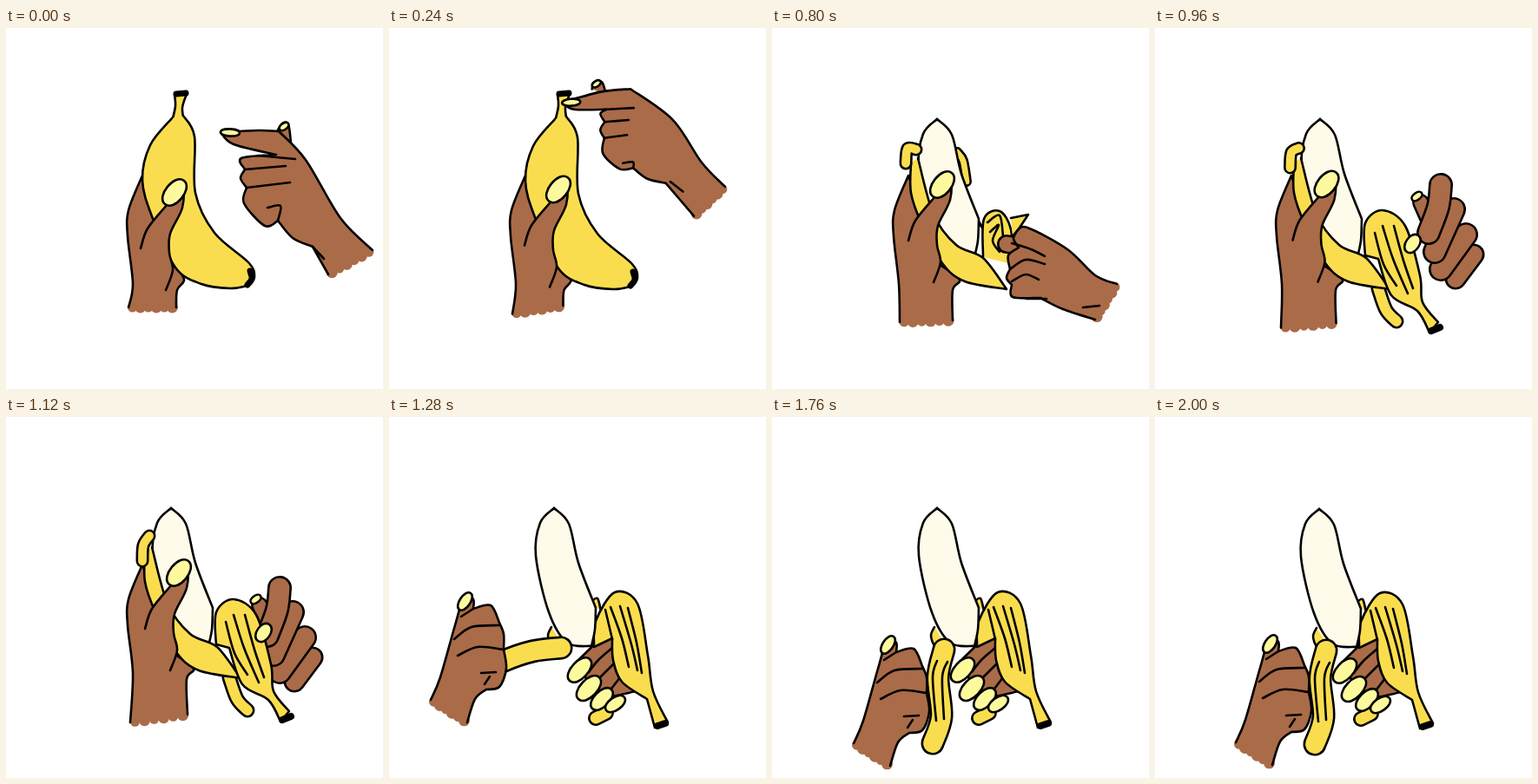
An HTML page with a canvas for the animation above (2.08 s loop, 434x416 px).

```html
<!DOCTYPE html>
<html lang="en">
<head>
<meta charset="utf-8">
<title>Peeling a banana</title>
<style>
html, body { margin: 0; width: 100%; height: 100%; overflow: hidden; background: #fff; }
canvas { display: block; }
</style>
</head>
<body>
<canvas id="c" width="434" height="416"></canvas>
<script>
const ctx = document.getElementById('c').getContext('2d');
const LOOP = 2080, STEP = 80, LINE = 2.6;
const INK = '#000', SKIN = '#aa6b48', PEEL = '#fadd4f', NAIL = '#fdfa9e', FLESH = '#fefbea';

const nums = s => (s.match(/-?[\d.]+/g) || []).map(Number);

// Blend two strings that hold the same count of numbers.
function mix(a, b, k) {
  const to = nums(b);
  let i = 0;
  return a.replace(/-?[\d.]+/g, n => (+n + (to[i++] - n) * k).toFixed(1));
}

// Keys alternate time and value; the value is eased between them.
function at(t, ...keys) {
  if (t <= keys[0]) return keys[1];
  for (let i = 2; i < keys.length; i += 2) {
    if (t <= keys[i]) {
      const k = (t - keys[i - 2]) / (keys[i] - keys[i - 2]);
      return mix(keys[i - 1], keys[i + 1], k * k * (3 - 2 * k));
    }
  }
  return keys[keys.length - 1];
}

// Smooth curve through points; "|" makes a corner, ";" starts a new line.
function trace(s) {
  ctx.beginPath();
  for (const sub of s.split(';')) {
    let last;
    for (const seg of sub.split('|')) {
      const n = nums(seg), p = last ? [last] : [];
      for (let i = 0; i < n.length; i += 2) p.push([n[i], n[i + 1]]);
      if (!last) ctx.moveTo(...p[0]);
      const end = p.length - 1, get = i => p[Math.max(0, Math.min(end, i))];
      for (let i = 0; i < end; i++) {
        const [a, b, c, d] = [get(i - 1), get(i), get(i + 1), get(i + 2)];
        ctx.bezierCurveTo(b[0] + (c[0] - a[0]) / 6, b[1] + (c[1] - a[1]) / 6,
          c[0] - (d[0] - b[0]) / 6, c[1] - (d[1] - b[1]) / 6, c[0], c[1]);
      }
      last = p[end];
    }
  }
}

function shape(s, fill) {
  trace(s);
  if (fill) { ctx.fillStyle = fill; ctx.fill(); }
  ctx.stroke();
}

// Outlined band with round ends along a curve.
function band(s, width, color) {
  trace(s);
  ctx.lineWidth = width;
  ctx.stroke();
  ctx.strokeStyle = color;
  ctx.lineWidth = width - 2 * LINE;
  ctx.stroke();
  ctx.strokeStyle = INK;
  ctx.lineWidth = LINE;
}

// Pointed oval from root to tip.
function nail(s, width) {
  const [x, y, u, v] = nums(s);
  const dx = (v - y) * width / 2, dy = (x - u) * width / 2;
  ctx.beginPath();
  ctx.moveTo(x, y);
  ctx.bezierCurveTo(x + dx, y + dy, u + dx, v + dy, u, v);
  ctx.bezierCurveTo(u - dx, v - dy, x - dx, y - dy, x, y);
  ctx.fillStyle = NAIL;
  ctx.fill();
  ctx.stroke();
}

function shifted(offset, draw) {
  ctx.save();
  ctx.translate(...nums(offset));
  draw();
  ctx.restore();
}

// Skin outline whose open ends form a ragged wrist.
function arm(s) {
  const n = nums(s), [u, v] = n.slice(-2);
  ctx.fillStyle = SKIN;
  for (let i = 0; i < 6; i++) {
    const k = (i + .5) / 6;
    ctx.beginPath();
    ctx.arc(n[0] + (u - n[0]) * k, n[1] + (v - n[1]) * k, 5.5 + i % 2, 0, 7);
    ctx.fill();
  }
  shape(s, SKIN);
}

function holdBack(t) {
  const [x, y, u, v, heel] = nums(at(t, 0, '141 322 196 322 205', 480, '143 337 205 318 214',
    800, '147 339 208 337 216', 1120, '143 352 209 343 216'));
  arm(`${x} ${y} 146 295 140 240 141 210 157 170|195 274|${heel} 290 ${heel - 8} 302 ${u} ${v}`);
}

function holdThumb(t) {
  shifted(at(t, 0, '-2 9', 480, '0 2', 800, '0 0', 1120, '3 -1'), () => {
    shape('157 245 165 222 187 195|199 169 206 170 205 198 191 228 190 250 194 270 186 293', SKIN);
    nail('185 194 207 167', .8);
  });
}

function whole(t) {
  const stem = at(t, 240, '194 77 195 90 191 108|205 108|203 92 208 76', 480, '223 81 216 92 205 108|219 108|227 94 235 83');
  const n = nums(stem);
  shape(stem, PEEL);
  band([n[0] + 2, n[1] - 1, ...n.slice(-2).map(v => v - 1)].join(' '), 7, INK);
  shifted(at(t, 0, '0 0', 480, '0 2'), () => {
    shape('191 104 166 135 157 175 168 217 195 276 225 295 258 300 278 297|286 287 279 270 240 236 218 190 217 125 204 101', PEEL);
    band('281 280 283 289 278 296', 7, INK);
  });
  if (t >= 400) {
    nail('174 124 187 122', .5);
    shape('179 119 169 133 170 148');
  }
}

const reachPose = (t, a, b) => at(t, 0, a, 320, b);

function reachThumb(t) {
  shape(reachPose(t, '311 121 318 110 325 111 328 132', '198 92 199 85 209 84 214 97'), SKIN);
  nail(reachPose(t, '315 117 325 110', '198 89 207 83'), .8);
}

function reachHand(t) {
  arm(reachPose(t,
    '422 256 385 219 345 152 314 119|290 118 247 120|262 134 311 146|271 150 275 163|270 173 277 184|274 202 298 228 313 222|330 242 353 252|371 284',
    '359 200 334 174 302 128 250 92|215 96 170 110|182 117 218 115|217 120 222 129|217 138 221 147|220 165 238 181 254 181|270 192 291 196|326 235'));
  shape(reachPose(t,
    '290 147 333 151;275 163 322 159;277 184 327 178;313 222 316 205 301 207;353 252 366 266',
    '218 115 251 112;222 129 246 127;221 147 243 144;254 181 253 176 242 177;297 194 312 205'));
  nail(reachPose(t, '247 120 269 121', '169 111 190 109'), .5);
}

const flesh = () =>
  shape('190 105 207 123 218 168 238 220|237 245 233 264|205 260 184 225 169 160 174 122 190 105', FLESH);

function halfPeeled(t) {
  if (t > 900) band('257 300 266 325 278 338', 17, PEEL);
  if (t < 900) {
    band('213 143 220 153 224 177', 12, PEEL);
    shape('216 170 225 200 245 234|228 210 216 175', PEEL);
  }
  flesh();
  shape('160 155 160 190 172 225 196 271 222 292 270 301|243 265 212 250 186 215 168 150', PEEL);
  band(at(t, 640, '170 123 159 132 157 148', 800, '166 140 156 139 154 156', 1120, '165 137 158 148 157 166'), 15, PEEL);
}

function pull(t) {
  shape(at(t, 640, '205 250 190 180 205 140 228 165 270 270',
    800, '243 264 244 220 262 211 275 232 276 272'), PEEL);
  shifted(at(t, 640, '-50 -90', 800, '0 0', 880, '6 6'), () => {
    if (t >= 720) shape('248 224 262 216 266 240;251 235 261 227 254 245 262 258');
    shape('275 219 295 215|285 230 277 240', PEEL);
    band('282 251 270 249', 22, SKIN);
    arm('397 295 372 285 340 255 294 230 282 234|278 243 284 253|272 262 274 278|270 288 276 296|277 310 309 311|335 324 372 336');
    shape('276 248 298 255 314 263;274 278 292 267 314 272;276 292 292 284 307 290;293 312 316 312;358 322 377 320');
  });
}

function fold(t) {
  shifted(at(t, 960, '14 -16', 1120, '0 0'), () => {
    band('292 217 300 235', 20, SKIN);
    nail('282 214 293 206', .8);
    band('353 277 332 305', 25, SKIN);
    band('344 254 315 294', 28, SKIN);
    band('330 225 308 274', 28, SKIN);
    band('315 197 312 222 301 252', 28, SKIN);
  });
  shape('242 264 242 225 262 210 288 228 305 285 308 316 326 339|316 351|302 326 272 308 257 266|242 262', PEEL);
  band('318 349 328 345', 8, INK);
  shape('253 236 263 272 278 297;262 228 274 266 291 306;275 228 286 268 297 300');
  nail('290 258 303 239', .9);
}

function opened(t) {
  shape('187 242 183 252 188 264 200 262', PEEL);
  shape('233 213 240 209 244 224', PEEL);
  band('238 347 250 341', 18, PEEL);
  shape('253 246 218 280|240 320 285 316|253 246', SKIN);
  shape('257 266 241 280 230 294;260 283 240 303;266 300 253 317');
  for (const tip of ['208 304 231 279', '218 325 242 300', '234 336 256 314', '250 338 271 323']) nail(tip, .75);
  shape('236 262 238 235 260 202 286 215 298 275 304 316 321 352|306 358|297 325|268 305 258 280 257 255|236 265', PEEL);
  shape('249 222 257 256;255 219 268 255 276 288;266 218 279 262 286 292;275 220 285 260 291 295');
  band('309 356 318 353', 8, INK);
  flesh();
  band(at(t,
    1200, '194 250 172 222 155 190 149 159',
    1280, '198 266 165 270 130 282 107 295',
    1360, '198 268 180 295 162 325 149 351',
    1440, '198 268 191 300 195 345 185 376'), 27, PEEL);
  if (t >= 1440) shape('190 281 185 300 189 350;202 282 196 300 198 348');
}

function fist() {
  arm('94 376 105 350 122 290 133 255 143 260 143 271|163 267 173 287|178 300 178 318|181 340 173 361 158 364|145 375 136 402');
  nail('127 272 140 253', .7);
  shape('143 271 129 280;121 306 141 292 173 290;125 325 148 315 177 318;152 345 169 344;156 358 162 349');
}

function scene(t) {
  ctx.fillStyle = '#fff';
  ctx.fillRect(0, 0, 434, 416);
  ctx.strokeStyle = INK;
  ctx.lineWidth = LINE;
  ctx.lineCap = ctx.lineJoin = 'round';
  if (t < 1200) holdBack(t);
  if (t < 640) {
    const move = at(t, 0, '0 0', 240, '18 -26', 480, '0 0', 560, '-4 8');
    shifted(move, () => reachThumb(t));
    whole(t);
    holdThumb(t);
    shifted(move, () => reachHand(t));
  } else if (t < 1200) {
    halfPeeled(t);
    holdThumb(t);
    t < 960 ? pull(t) : fold(t);
  } else {
    const odd = t >= 1440 && t / STEP % 2;
    shifted(odd ? '-1 1' : '0 0', () => opened(t));
    shifted(odd ? '-1 -1' : at(t, 1200, '-20 -140', 1280, '-46 -50', 1360, '-22 -5', 1440, '0 0'), fist);
  }
}

const start = performance.now();
function tick() {
  const t = (performance.now() - start) % LOOP;
  scene(Math.floor(t / STEP) * STEP);
  requestAnimationFrame(tick);
}
tick();
</script>
</body>
</html>
```
